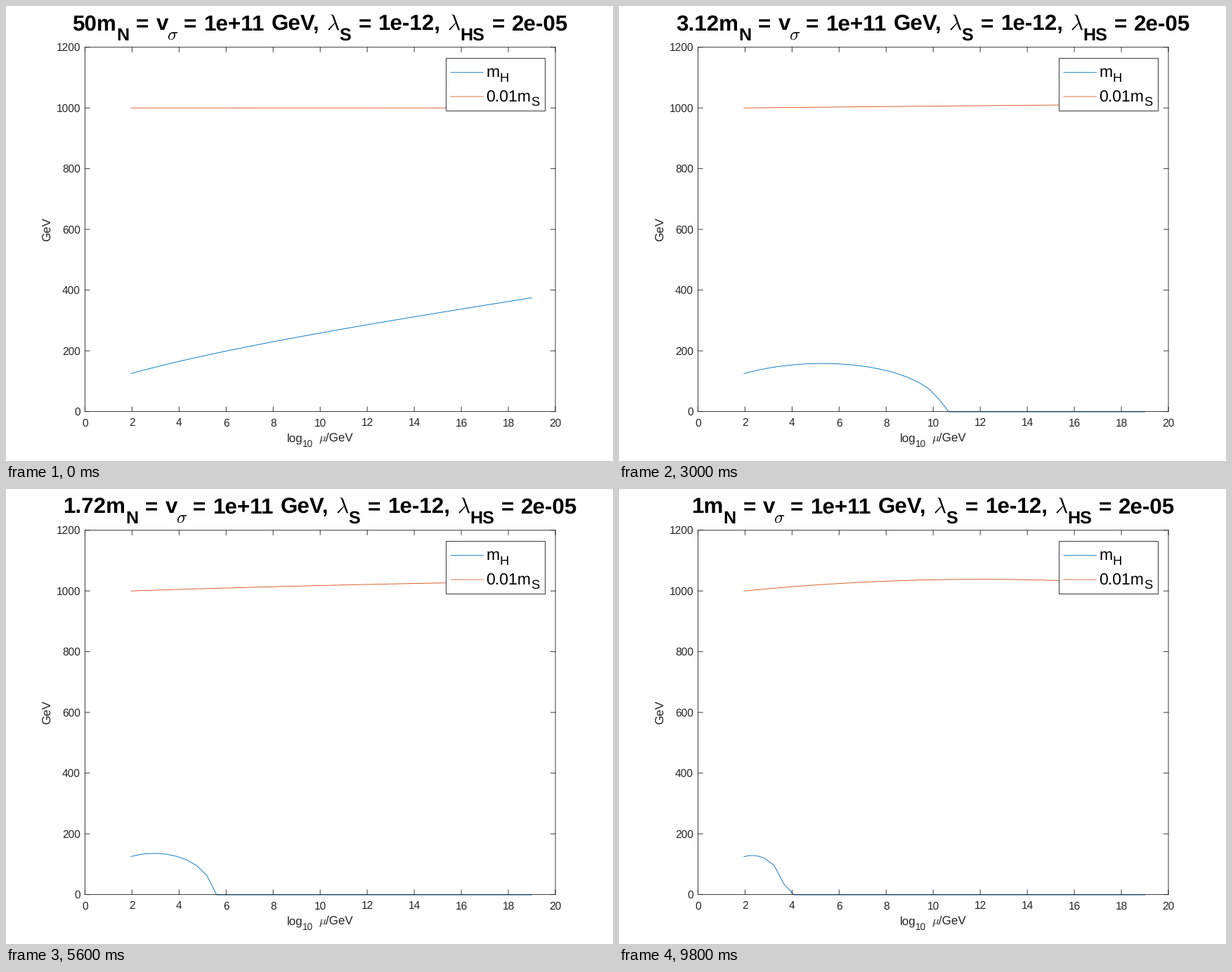
These frames come from a looping animation (864x648 px, 10 s). A matplotlib script:

```python
import numpy as np
import matplotlib as mpl
import matplotlib.pyplot as plt
from matplotlib.animation import FuncAnimation
from matplotlib.patches import Rectangle
from matplotlib.textpath import TextPath

mpl.rcParams.update({
    "font.family": "Liberation Sans",
    "mathtext.fontset": "cm",
    "text.hinting": "none",
    "toolbar": "None",
})

W, H, DPI = 864, 648, 100
PT = 72 / DPI
LEFT, RIGHT, TOP, BOTTOM = 112.4, 782.0, 58.7, 577.6
ZERO, UNIT = 578.0, 0.4328  # pixel row of value 0, pixels per GeV
INK, BLUE, ORANGE = "#262626", "#0072BD", "#D95319"
GREEK = {"λ": (r"$\lambda$", 0.583), "σ": (r"$\sigma$", 0.571),
         "μ": (r"$\mu$", 0.603)}
FRAMES, STEP_MS = 50, 200

fig = plt.figure(figsize=(W / DPI, H / DPI), dpi=DPI, facecolor="white")
ax = fig.add_axes([0, 0, 1, 1])
ax.set_xlim(0, W)
ax.set_ylim(H, 0)
ax.axis("off")


def px(v):
    return LEFT + v * (RIGHT - LEFT) / 20


def py(v):
    return ZERO - v * UNIT


def stroke(xs, ys, color=INK, width=0.9, z=4):
    line, = ax.plot(xs, ys, color=color, lw=width * PT, zorder=z,
                    snap=False, clip_on=False)
    return line


def label(x, y, s, size, color=INK, z=6, **kw):
    s = GREEK[s][0] if s in GREEK else s
    return ax.text(x, y, s, fontsize=size * PT, color=color, zorder=z,
                   va=kw.pop("va", "baseline"), **kw)


def advance(s, size, weight="normal"):
    if s in GREEK:
        return GREEK[s][1] * size
    prop = {"family": "Liberation Sans", "weight": weight}

    def edge(t):
        return TextPath((0, 0), t, size=100, prop=prop).get_extents().x1

    return (edge(s + ".") - edge(".")) * size / 100


def run(x, y, parts, size, drop, color=INK):
    """Lay out (text, is_subscript) parts from left to right."""
    for s, sub in parts:
        em = size * (0.8 if sub else 1)
        label(x, y + drop * sub, s, em, color)
        x += advance(s, em)


# Axes box, ticks and labels
ax.add_patch(Rectangle((LEFT, TOP), RIGHT - LEFT, BOTTOM - TOP, fill=False,
                       ec=INK, lw=0.9 * PT, zorder=4, snap=False))
TICK = 6.7
for v in range(0, 21, 2):
    x = px(v)
    stroke([x, x], [BOTTOM, BOTTOM - TICK])
    stroke([x, x], [TOP, TOP + TICK])
    label(x, 598.4, str(v), 15.5, ha="center")
for v in range(0, 1201, 200):
    y = BOTTOM - v * (BOTTOM - TOP) / 1200
    stroke([LEFT, LEFT + TICK], [y, y])
    stroke([RIGHT, RIGHT - TICK], [y, y])
    label(106, y + 5.6, str(v), 15.5, ha="right")

run(399.5, 620, [("log", 0), ("10", 1)], 17, 7.5)
label(445, 620, "μ", 17)
label(455, 620, "/GeV", 17)
label(67.3, 317.5, "GeV", 17, rotation=90, ha="right", va="center")

# Legend
ax.add_patch(Rectangle((626.5, 74.5), 141, 75, fc="white", ec=INK,
                       lw=0.9 * PT, zorder=5, snap=False))
stroke([633, 679.5], [94.5, 94.5], BLUE, 0.8, 6)
stroke([633, 679.5], [129, 129], ORANGE, 0.8, 6)
run(683, 101, [("m", 0), ("H", 1)], 23, 6.7, "black")
run(683, 135.5, [("0.01m", 0), ("S", 1)], 23, 6.7, "black")

# Title: (text, is_subscript, space_after)
SIZE, SPACE = 31.4, 0.317 * 31.4
TAIL = [
    ("N", 1, 1), ("=", 0, 1), ("v", 0, 0), ("σ", 1, 1), ("=", 0, 1),
    ("1e+11", 0, 1), ("GeV,", 0, 1), ("λ", 0, 0), ("S", 1, 1), ("=", 0, 1),
    ("1e-12,", 0, 1), ("λ", 0, 0), ("HS", 1, 1), ("=", 0, 1), ("2e-05", 0, 0),
]


def title_part(s, sub):
    return label(0, 34.5 + 14.3 * sub, s, SIZE * (0.8 if sub else 1),
                 "black", weight="bold")


head = title_part("50m", 0)
tail = [title_part(s, sub) for s, sub, _ in TAIL]
tail_adv = [advance(s, SIZE * (0.8 if sub else 1), "bold") + SPACE * gap
            for s, sub, gap in TAIL]


def set_title(n):
    s = f"{50 / n:.3g}m"
    head.set_text(s)
    first = advance(s, SIZE, "bold")
    x = (LEFT + RIGHT) / 2 - (first + sum(tail_adv)) / 2
    head.set_x(x)
    x += first
    for part, adv in zip(tail, tail_adv):
        part.set_x(x)
        x += adv


# Running masses over s = log10(mu) - S0
S0, SPAN = 1.96, 17.04
DS = SPAN / 40
grid = np.linspace(0, SPAN, 1705)
decay = np.exp(-0.033 * grid - 0.234 * (1 - np.exp(-grid / 6.5)))


def cumulative(f):
    return np.append(0, np.cumsum((f[1:] + f[:-1]) / 2 * np.diff(grid)))


I0, I1 = cumulative(decay), cumulative(grid * decay)


def samples(n):
    """Four short steps first, then an even spacing to the end."""
    h = DS / (0.722 - 8.7e-5 * n * n)
    s = np.concatenate([np.arange(4) * h / 4, np.arange(h, SPAN, DS)])
    return np.append(s, SPAN)


def higgs(n, s):
    m2 = (126 ** 2 + 4360 * I0 - 7.24 * n ** 1.973 * I1) / decay
    return np.sqrt(np.maximum(np.interp(s, grid, m2), 0))


def scalar(n, s):
    r = (n / 50) ** 2
    return 1000 * (1 + 0.0076 * r * s - 0.000377 * (r * s) ** 2)


blue = stroke([], [], BLUE, 0.9, 3)
orange = stroke([], [], ORANGE, 0.9, 3)


def update(i):
    n = i + 1
    s = samples(n)
    x = px(S0 + s)
    blue.set_data(x, py(higgs(n, s)))
    orange.set_data(x, py(scalar(n, s)))
    set_title(n)
    return [blue, orange, head, *tail]


anim = FuncAnimation(fig, update, frames=FRAMES, interval=STEP_MS,
                     init_func=lambda: update(0), repeat=True, repeat_delay=0)
plt.show()
```
